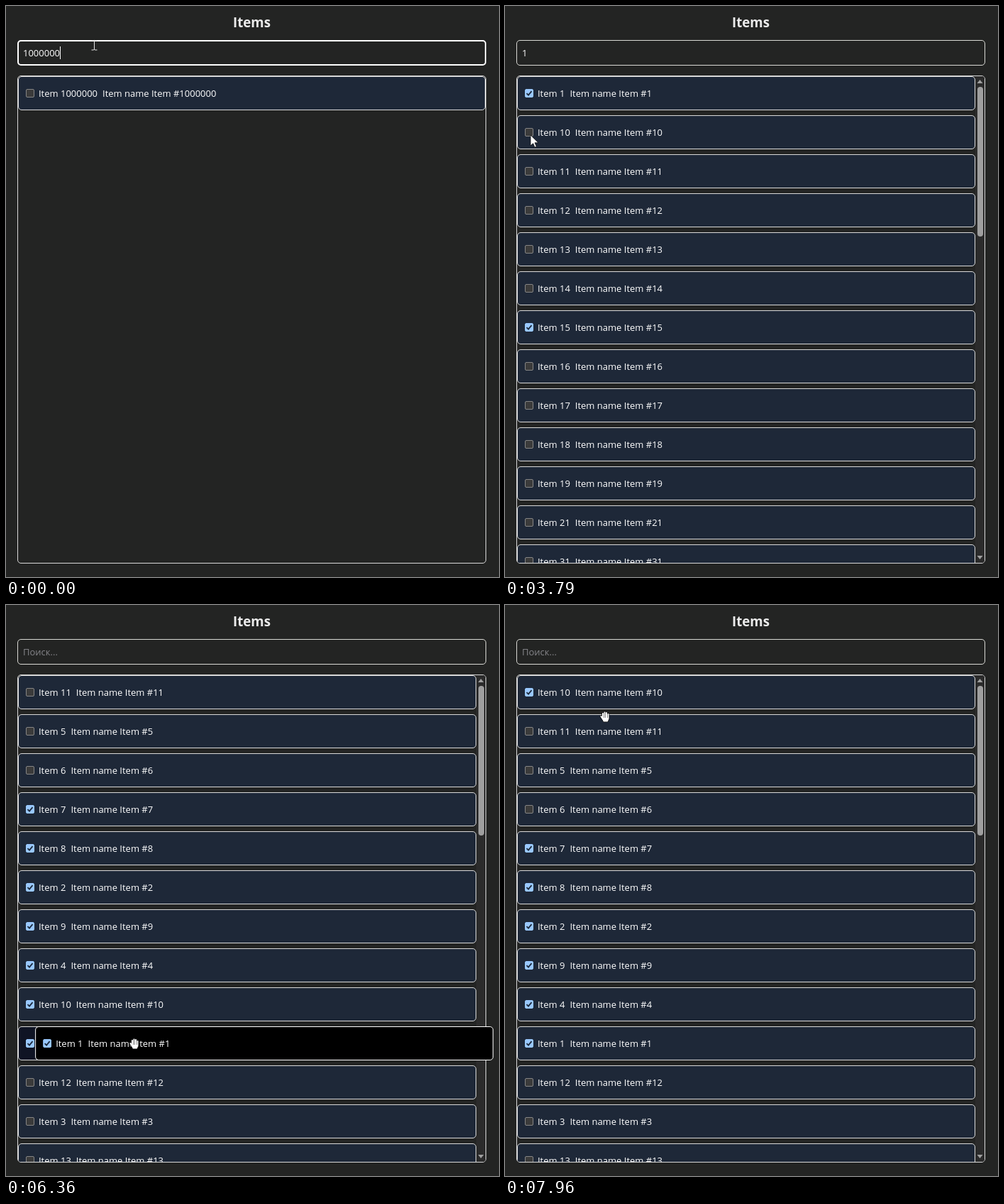
Recreate the animation shown at these times as an HTML page. Size 695x805 px, loop 8000 ms.

```html
<!DOCTYPE html>
<html lang="en">
<head>
<meta charset="utf-8">
<title>Items</title>
<style>
  html, body { margin: 0; width: 100%; height: 100%; overflow: hidden; background: #232423; }
  body { position: relative; font: 13px/18px "Open Sans", "Noto Sans", sans-serif; color: #fff; }
  body * { box-sizing: border-box; }
  #stage { position: absolute; left: 0; top: 0; width: 695px; height: 805px; overflow: hidden; }
  h1 { position: absolute; left: 0; top: 10px; width: 693px; margin: 0; text-align: center;
       font-size: 18.7px; line-height: 26px; font-weight: 700; color: #ececec; }
  #search { position: absolute; left: 16px; top: 48px; width: 661px; height: 36px;
            border: 1px solid #d9d9d4; border-radius: 5px; }
  #search.focus { border: 2px solid #fff; }
  #field { position: absolute; left: 24px; top: 57px; height: 18px; white-space: pre; display: flex; }
  #caret { width: 1px; height: 18px; background: #fff; }
  #hint { position: absolute; left: 24px; top: 57px; color: #85858a; }
  #list { position: absolute; left: 16px; top: 98px; width: 661px; height: 688px;
          border: 1px solid #d9d9d9; border-radius: 5px; overflow: hidden; }
  .row { position: absolute; left: 0; top: 0; width: 646px; height: 48px; display: flex; align-items: center;
         padding-left: 10px; white-space: pre; background: #1e2838; border: 1px solid #d9d9d9; border-radius: 5px; }
  .wide .row { width: 659px; }
  .row svg { width: 12px; height: 12px; margin-right: 6px; flex: none; }
  .row b { font-weight: 400; margin-right: 7px; }
  .row.ghost { background: #0f1424; }
  #overlay { background: #000; border-color: #fff; }
  .box { fill: #3b3b3b; stroke: #858585; }
  .tick { fill: none; stroke: none; }
  .on .box { fill: #99c8ff; stroke: #99c8ff; }
  .on .tick { stroke: #1c2a3c; stroke-width: 1.8; }
  #bar { position: absolute; right: 0; top: 0; width: 13px; height: 686px; background: #2b2b2b; }
  .wide #bar { display: none; }
  #bar svg { position: absolute; left: 0; top: 0; fill: #9f9f9f; }
  #thumb { position: absolute; left: 3px; top: 15px; width: 8px; border-radius: 4px; background: #9f9f9f; }
  #pointer { position: absolute; left: -12px; top: -12px; width: 24px; height: 24px; overflow: visible; }
  #hand { fill: #fff; stroke: #fff; stroke-width: 2; stroke-linecap: round; stroke-linejoin: round; }
  #hand .edge { stroke: #111; stroke-width: 3.6; }
  #hand.held { fill: #fffde0; stroke: #fffde0; transform: scale(.8); }
  #hand.held .edge { stroke: #8a8a20; }
</style>
</head>
<body>
<div id="stage">
  <h1>Items</h1>
  <div id="search"></div>
  <div id="hint">Поиск...</div>
  <div id="field"><span id="query"></span><i id="caret"></i></div>
  <div id="list">
    <div id="bar">
      <svg width="13" height="686"><path d="M2.5 10 6.5 5l4 5zM2.5 676l4 5 4-5z"/></svg>
      <div id="thumb"></div>
    </div>
  </div>
  <svg id="pointer" viewBox="-12 -12 24 24">
    <circle id="press" r="10.5" fill="#ebeb1e" fill-opacity=".55"/>
    <path id="ibeam" d="M-3.5-6.5H-1L.5-6 2-6.5H4.5M.5-6V6.5M-3.5 7H-1L.5 6.5 2 7H4.5" fill="none" stroke="#e4e4e4"/>
    <path id="arrow" d="M0 0V15L3.6 11.7 6 17.2 8.4 16.2 6 10.8H11Z" fill="#fff" stroke="#111" stroke-width=".8"/>
    <g id="hand"></g>
  </svg>
</div>
<script>
const LOOP = 8000, PITCH = 55, SHOWN = 13, LIMIT = 39, SETTLE = 250, LAG = 56, BLINK = 530;
const $ = id => document.getElementById(id);
const show = (el, on) => { el.style.display = on ? "" : "none"; };
const clamp = (v, lo, hi) => Math.min(hi, Math.max(lo, v));

const deletes = [460, 720, 1110, 1250, 1710, 1970], cleared = 4800;
const blur = 3380, refocus = 4660, clicks = { 1: blur, 10: 3860 };
const preset = [15, 7, 8, 2, 9, 4];

// Pointer moves: start, end, x, y
const home = [124, 55];
const moves = [
  [2450, 3200, 37, 126], [3420, 3590, 36, 182],
  [3900, 4500, 125, 66], [4800, 4990, 96, 86], [4990, 5260, 155, 123],
  [5440, 5640, 164, 236], [5782, 5936, 168, 531], [5936, 6110, 181, 618],
  [6400, 6800, 150, 563], [7112, 7430, 154, 118], [7660, 7860, 152, 157], [7950, 7958, 141, 157]
];
const drags = [{ from: 0, start: 5380, drop: 6340 }, { from: 8, start: 6930, drop: 7620 }];

// cubic-bezier(.25, .1, .25, 1)
function ease(x) {
  if (x <= 0) return 0;
  if (x >= 1) return 1;
  const curve = (u, a, b) => 3 * u * (1 - u) * (1 - u) * a + 3 * u * u * (1 - u) * b + u * u * u;
  let lo = 0, hi = 1;
  for (let i = 0; i < 20; i++) {
    const mid = (lo + hi) / 2;
    if (curve(mid, .25, .25) < x) lo = mid; else hi = mid;
  }
  return curve(lo, .1, 1);
}

function pointerAt(t) {
  let [x, y] = home;
  for (const [a, b, toX, toY] of moves) {
    const u = clamp((t - a) / (b - a), 0, 1), p = u * u * (3 - 2 * u);
    x += (toX - x) * p;
    y += (toY - y) * p;
  }
  return [x, y];
}

function queryAt(t) {
  const gone = deletes.filter(d => d <= t).length;
  return t < cleared ? "1".padEnd(7 - gone, "0") : "";
}

function search(query) {
  const found = [];
  for (let n = +query; n <= 1e6 && found.length < LIMIT; n++)
    if (String(n).includes(query)) found.push(n);
  return found;
}

const results = {};
for (const t of [0, ...deletes]) results[queryAt(t)] = search(queryAt(t));

// Offset of the lifted row, trailing the pointer slightly
function lifted(d, t) {
  const [x0, y0] = pointerAt(d.start), [x, y] = pointerAt(Math.max(t - LAG, d.start));
  return [x - x0, y - y0 + d.from * PITCH];
}

// Record when the lifted row comes closest to another slot
let order = [1, 11, 5, 6, 7, 8, 2, 9, 4, 10, 12, 3, 13];
for (const d of drags) {
  d.order = order;
  d.events = [];
  d.to = d.from;
  for (let t = d.start; t <= d.drop; t += 2) {
    const over = clamp(Math.round(lifted(d, t)[1] / PITCH), 0, SHOWN - 1);
    if (over !== d.to) d.events.push([t, d.to = over]);
  }
  order = order.slice();
  order.splice(d.to, 0, order.splice(d.from, 1)[0]);
}

function slot(i, from, over) {
  if (i === from) return over;
  if (i > from && i <= over) return i - 1;
  if (i < from && i >= over) return i + 1;
  return i;
}

// Each new target restarts the transition from the current place
function rowY(d, i, t) {
  let start = i, goal = i, since = 0;
  const at = now => start + (goal - start) * ease((now - since) / SETTLE);
  for (const [when, over] of d.events) {
    const next = slot(i, d.from, over);
    if (when > t || next === goal) continue;
    start = at(when);
    goal = next;
    since = when;
  }
  return at(t) * PITCH;
}

function makeRow(parent, before) {
  const el = document.createElement("div");
  el.className = "row";
  el.innerHTML = '<svg viewBox="0 0 12 12"><rect class="box" x=".5" y=".5" width="11" height="11" rx="1.5"/>' +
    '<path class="tick" d="M2.5 6.2 5 8.6 9.5 3.2"/></svg><b></b><span></span>';
  parent.insertBefore(el, before);
  return el;
}

function fillRow(el, n, x, y, t) {
  if (el.item !== n) {
    el.item = n;
    el.children[1].textContent = "Item " + n;
    el.children[2].textContent = "Item name Item #" + n;
  }
  el.classList.toggle("on", preset.includes(n) || t >= clicks[n]);
  el.style.transform = `translate(${x}px, ${y}px)`;
}

const rows = Array.from({ length: SHOWN }, () => makeRow($("list"), $("bar")));
const overlay = makeRow($("stage"), $("pointer"));
overlay.id = "overlay";

const fingers = "M-5.5 0-3 4M-3-4V3M-.5-5.5V3M2-5V3M4.5-3V3M-3 3H4.5L3 6.5H-1.5Z";
$("hand").innerHTML = `<path class="edge" d="${fingers}"/><path d="${fingers}"/>`;

function drawPointer(t) {
  const [x, y] = pointerAt(t);
  const held = drags.some(d => t >= d.start && t < d.drop);
  const clicked = [...Object.values(clicks), refocus].some(c => t >= c && t < c + 70);
  const kind = y > 47 && y < 88 ? "ibeam" : x < 44 || y < 99 ? "arrow" : "hand";
  for (const id of ["ibeam", "arrow", "hand"]) show($(id), id === kind);
  $("hand").setAttribute("class", held ? "held" : "");
  show($("press"), held || clicked);
  $("pointer").style.transform = `translate(${x}px, ${y}px)`;
}

function draw(t) {
  const query = queryAt(t);
  const next = drags.find(d => t < d.drop + SETTLE);
  const drag = next && t >= next.start ? next : null;
  const items = query ? results[query] : next ? next.order : order;
  const count = query ? items.length : LIMIT;
  const focused = t < blur || (t >= refocus && t < drags[0].start);

  $("search").className = focused ? "focus" : "";
  $("query").textContent = query;
  show($("hint"), !query);
  show($("caret"), focused && (t + 2 * BLINK - 200) % (2 * BLINK) >= BLINK);
  $("list").className = count < SHOWN ? "wide" : "";
  $("thumb").style.height = clamp(657 * 687 / (count * PITCH - 7), 0, 657) + "px";

  rows.forEach((el, i) => {
    show(el, i < items.length);
    if (i >= items.length) return;
    fillRow(el, items[i], 0, drag ? rowY(drag, i, t) : i * PITCH, t);
    el.classList.toggle("ghost", !!drag && i === drag.from);
  });

  show(overlay, drag);
  if (drag) {
    const [x, y] = lifted(drag, Math.min(t, drag.drop));
    const p = ease((t - drag.drop) / SETTLE);
    fillRow(overlay, drag.order[drag.from], 17 + x * (1 - p), 99 + y + (drag.to * PITCH - y) * p, t);
  }
  drawPointer(t);
}

function tick() {
  draw(performance.now() % LOOP);
  requestAnimationFrame(tick);
}
tick();
</script>
</body>
</html>
```
